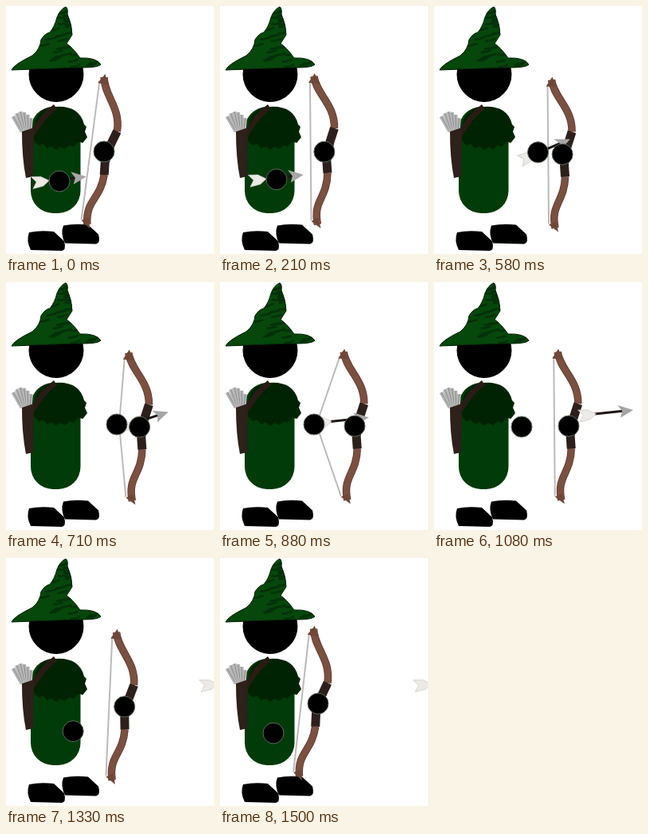
An HTML page with a canvas for the animation above (1.54 s loop, 261 by 310 pixels).

```html
<!DOCTYPE html>
<html>
<head>
<meta charset="utf-8">
<title>Archer</title>
<style>
html, body { margin: 0; overflow: hidden; background: #fff; }
canvas { display: block; }
</style>
</head>
<body>
<canvas id="stage" width="261" height="310"></canvas>
<script>
const ctx = document.getElementById('stage').getContext('2d');
const LOOP = 1540, FPS = 24;
const RELEASE = 23;

const ramp = (v, from, to) => Math.min(1, Math.max(0, (v - from) / (to - from)));
const smooth = u => u * u * (3 - 2 * u);
const mix = (a, b, u) => a + (b - a) * u;

function fill(d, color) {
  ctx.fillStyle = color;
  ctx.fill(new Path2D(d));
}

function line(d, color, width) {
  ctx.strokeStyle = color;
  ctx.lineWidth = width;
  ctx.stroke(new Path2D(d));
}

function disc(x, y, r, edge = '#000') {
  ctx.beginPath();
  ctx.arc(x, y, r, 0, 7);
  ctx.fillStyle = '#000';
  ctx.fill();
  ctx.strokeStyle = edge;
  ctx.lineWidth = 1;
  ctx.stroke();
}

function placed(x, y, angle, draw) {
  ctx.save();
  ctx.translate(x, y);
  ctx.rotate(angle * Math.PI / 180);
  draw();
  ctx.restore();
}

function drawHat() {
  const hat = 'M75 1Q78 3 77 10Q83 24 83 36L76 47Q83 51 93 65Q113 64 119 73Q116 77 95 77Q60 78 7 80Q10 73 33 62Q43 54 44 42Q49 34 55 33Q61 26 64 14Q68 4 75 1Z';
  let seed = 7;
  const random = () => (seed = seed * 16807 % 2147483647) / 2147483647;
  fill(hat, '#06470c');
  ctx.save();
  ctx.clip(new Path2D(hat));
  for (let y = 8; y < 78; y += 2) {
    const x = 68 + (random() - .5) * y * 1.2;
    line(`M${x} ${y}q6 ${random() * 6 - 2} 13 -3`, '#03300a', 2.5);
  }
  ctx.restore();
  line(hat, '#021c04', 1);
}

function drawBody() {
  ctx.beginPath();
  ctx.roundRect(31, 126, 62.5, 133, 28);
  ctx.fillStyle = '#003b09';
  ctx.fill();

  let cape = 'M35 168Q32 126 62 126Q92 124 98 148L101 151L99 157L102 164';
  for (let i = 1; i < 12; i++) {
    const u = i / 12;
    cape += `L${102 - 67 * u} ${164 + 10 * Math.sin(Math.PI * u) + 4 * u + i % 2 * 4}`;
  }
  fill(cape + 'Z', '#002403');
  line('M62 126Q46 137 33 160', '#2a1c15', 7);
}

function drawQuiver() {
  for (let i = 0; i < 6; i++) {
    const shaft = `M${20 + i * 2} 157L${9 + i * 4.5} ${138 - 6 * Math.sin(i * .7)}`;
    line(shaft, '#b8b8b8', 5);
    line(shaft, '#8a8a8a', 1);
  }
  fill('M20 157L35 152L34 213L25 215Q20 190 20 157Z', '#2e201a');
}

function drawArcher() {
  disc(63, 85.5, 34);
  drawHat();
  drawBody();
  drawQuiver();
  for (const [x, y] of [[27, 281], [70, 272.5]]) {
    placed(x, y, 0, () => fill('M2 2Q16 -1 33 1L46 13Q49 24 43 25L4 24Q-2 12 2 2Z', '#000'));
  }
}

function drawBow() {
  const limbs = 'M5 -93C8 -70 31 -58 30 -28M21 28C20 60 2 62 8 92';
  const tips = 'M6 -97L11 -84L-2 -85ZM12 97L0 88L9 84Z';
  line(limbs, '#5a382b', 9.5);
  line(limbs, '#7b5040', 8);
  fill(tips, '#6f4637');
  line('M30 -28L24 -10L20 12L21 28', '#2d201c', 11);
}

function drawArrow() {
  const feathers = 'M-34 -7L-22 -6L-12 0L-20 6L-33 8L-28 0Z';
  line('M-14 0H22', '#1e1714', 3);
  fill(feathers, '#ece9e7');
  line(feathers, '#cfcac8', .7);
  fill('M16 -8L35 0L18 8L21 0Z', '#a6a6a6');
}

function drawHandAt(step) {
  const up = smooth(ramp(step, 3, 17));
  const pull = ramp(step, 18, RELEASE);
  const recoil = ramp(step, RELEASE, 26);
  const down = ramp(step, 26, 36);
  return [
    67 + 72 * up - 35 * pull + 6 * recoil - 43 * down,
    219 - 41 * up + 3 * recoil + 38 * (1 - (1 - down) ** 3)
  ];
}

function arrowAt(step) {
  const [x, y] = drawHandAt(Math.min(step, RELEASE));
  const slide = smooth(ramp(step, 12, 18));
  const flight = ramp(step, RELEASE, 28.4);
  const tilt = Math.sin(Math.PI * ramp(step, 8, 20));
  return [x - 1 + 35 * slide + 139 * flight, y - 2 - 3 * slide - 17 * flight, -6 - 17 * tilt];
}

function render(step) {
  const back = ramp(step, 26, 36) ** 1.6;
  const aim = smooth(ramp(step, 0, 19)) * (1 - back);
  const dip = 6 * Math.sin(Math.PI * aim * aim);
  const bowX = mix(106, 151, aim) - 4 * back, bowY = 180.5 + dip;
  const bowAngle = 8 * (1 - ramp(step, 0, 5)) + 7 * back - .5;
  const hand = drawHandAt(step);

  ctx.fillStyle = '#fff';
  ctx.fillRect(0, 0, 261, 310);
  drawArcher();
  placed(bowX, bowY, bowAngle, () => {
    const held = step >= 17 && step <= RELEASE;
    const nock = held ? `L${hand[0] + 3 - bowX} ${hand[1] - bowY}` : '';
    line(`M0 -87${nock}L0 87`, '#bdb9b9', 2);
    drawBow();
  });
  placed(...arrowAt(step), drawArrow);
  disc(mix(123, 169, aim), mix(182, 180, aim) + dip, 13, '#5c6b5c');
  disc(...hand, 13, '#5c6b5c');
}

function tick() {
  // Steps start on hundredths of a second
  const t = Math.floor(performance.now() % LOOP / 10) * 10;
  render(Math.max(0, Math.ceil((t + 5) * FPS / 1000 - 1e-6) - 1));
  requestAnimationFrame(tick);
}
tick();
</script>
</body>
</html>
```
